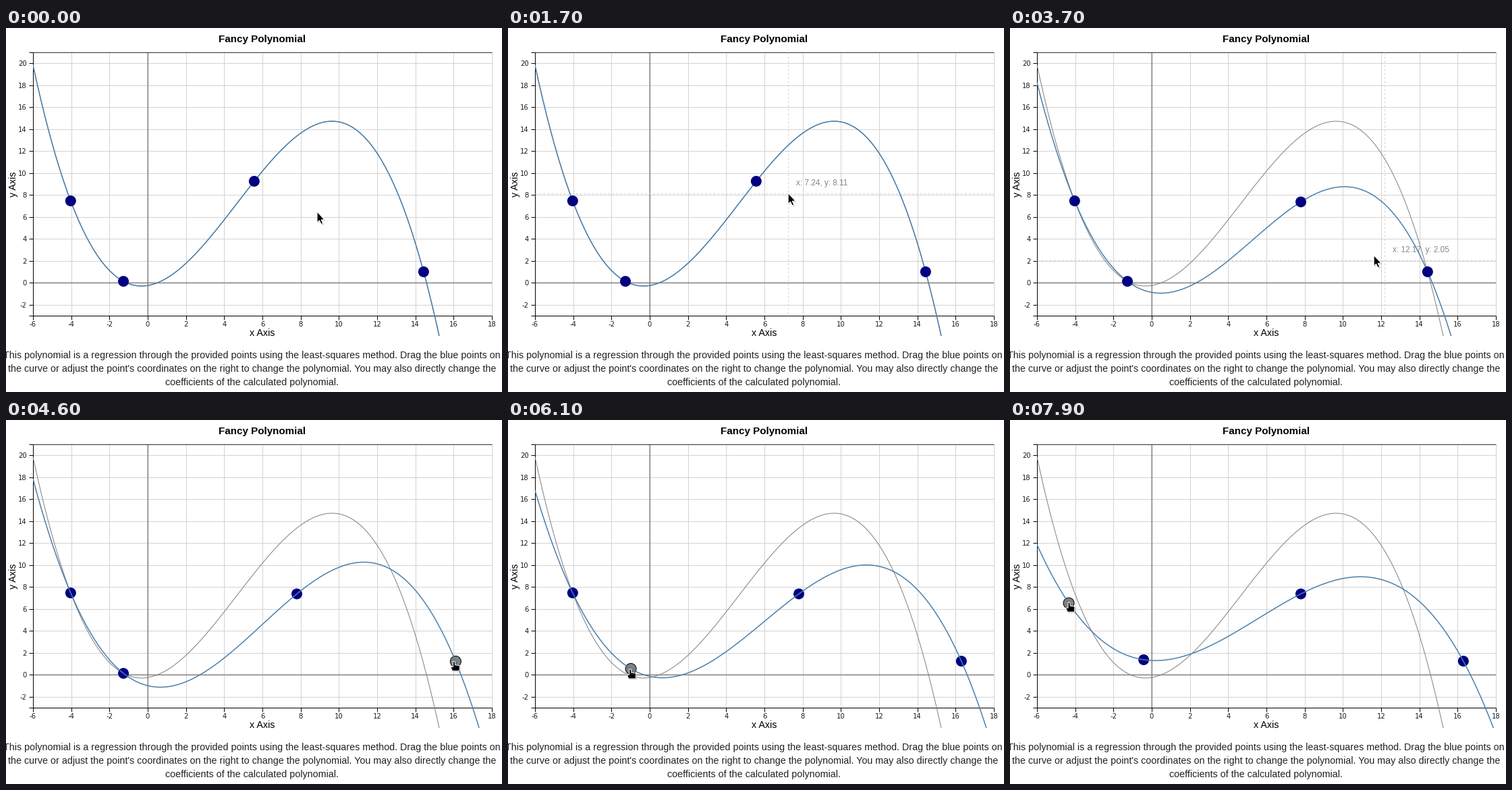
Animation of 735x539 px, one loop 8 s. Source, as a matplotlib script:

```python
import numpy as np
import matplotlib.pyplot as plt
from matplotlib.animation import FuncAnimation
from matplotlib.patches import Circle, Polygon, Rectangle

W, H, DPI = 735, 539, 100
PX = 72 / DPI
STEP, FRAMES = 100, 80
LEFT, RIGHT, TOP, BOTTOM = 40, 720, 36, 426
SX, SY = (RIGHT - LEFT) / 24, (BOTTOM - TOP) / 24
NAVY, STEEL, GRAY, PALE = "#000080", "#4a7fab", "#808080", "#d3d3d3"
HOVER, BOW, POINTER_LAG = 100, 19, 30


def to_px(x, y):
    return LEFT + (np.asarray(x) + 6) * SX, TOP + (21 - np.asarray(y)) * SY


def to_data(x, y):
    return (x - LEFT) / SX - 6, 21 - (y - TOP) / SY


# The pointer rests, pauses, then visits and drags each point in turn
REST, PAUSE = (8.86, 6.41), (7.24, 8.11)
POINTS = [(-4.03, 7.46), (-1.27, 0.13), (5.57, 9.25), (14.43, 1.0)]
# Point index: drag start, drag end, destination
DRAGS = {
    2: (2450, 3350, (7.80, 7.37)),
    3: (4000, 4670, (16.30, 1.24)),
    1: (5800, 6700, (-0.42, 1.37)),
    0: (7400, 7900, (-4.34, 6.53)),
}


def build_legs():
    legs = [(800, 1600, REST, PAUSE, False)]
    place, leave = PAUSE, 1750
    for index, (start, end, goal) in DRAGS.items():
        legs.append((leave, start - HOVER, place, POINTS[index], False))
        legs.append((start, end, POINTS[index], goal, True))
        place, leave = goal, end
    return legs


LEGS = build_legs()


def cursor_at(t):
    """Free moves ease along a slight arc; drags are straight and even."""
    begin, finish, a, b, drag = [leg for leg in LEGS if leg[0] <= max(t, 800)][-1]
    u = np.clip((t - begin) / (finish - begin), 0, 1)
    a, b = np.array(to_px(*a)), np.array(to_px(*b))
    if drag:
        return a + (b - a) * u
    u = u * u * (3 - 2 * u)
    dx, dy = b - a
    normal = np.array([-dy, dx]) / np.hypot(dx, dy)
    return a + (b - a) * u + normal * BOW * 4 * u * (1 - u)


def point_at(index, t):
    start, end, _ = DRAGS[index]
    return cursor_at(np.clip(t, start, end))


def points_at(t):
    return np.array([point_at(i, t) for i in range(len(POINTS))])


def fitted_curve(points):
    coeffs = np.polyfit(*to_data(points[:, 0], points[:, 1]), 3)
    x = np.arange(-6, 18.01, 0.2)
    return to_px(x, np.polyval(coeffs, x))


fig = plt.figure(figsize=(W / DPI, H / DPI), dpi=DPI, facecolor="white")
ax = fig.add_axes([0, 0, 1, 1])
ax.set(xlim=(0, W), ylim=(H, 0))
ax.axis("off")


def line(x, y, color, width=1, z=1, **kw):
    return ax.plot(x, y, color=color, lw=width * PX, zorder=z,
                   solid_capstyle="butt", **kw)[0]


def label(x, y, text, size, font="Liberation Sans", color="black", ha="center", **kw):
    return ax.text(x, y, text, fontsize=size * PX, fontfamily=font, color=color,
                   ha=ha, va="baseline", zorder=4, **kw)


# Grid, ticks and axes
for v in range(-6, 19, 2):
    x = to_px(v, 0)[0]
    line([x, x], [TOP, BOTTOM], PALE)
    line([x, x], [BOTTOM, BOTTOM + 6], "black", z=3)
    label(x, 442, str(v), 10, "DejaVu Sans", "#1a1a1a")
for v in range(-2, 21, 2):
    y = to_px(0, v)[1]
    line([LEFT, RIGHT], [y, y], PALE)
    line([LEFT - 6, LEFT], [y, y], "black", z=3)
    label(31, y + 4, str(v), 10, "DejaVu Sans", "#1a1a1a", ha="right")
zero_x, zero_y = to_px(0, 0)
line([zero_x + 0.3] * 2, [TOP, BOTTOM], GRAY, 1.5, 2, snap=False)
line([LEFT, RIGHT], [zero_y + 0.2] * 2, GRAY, 1.5, 2, snap=False)
line([LEFT - 6, LEFT, LEFT, LEFT - 6], [TOP, TOP, BOTTOM, BOTTOM], "black", z=3)
line([LEFT, RIGHT], [BOTTOM, BOTTOM], "black", z=3)
line([LEFT, RIGHT], [TOP, TOP], "#303030", z=3)

# Captions
label(380, 21, "Fancy Polynomial", 15.1, weight="bold")
label(380, 456, "x Axis", 14.2)
label(15, 231, "y Axis", 14.2, rotation=90, rotation_mode="anchor")
CAPTION = (
    "This polynomial is a regression through the provided points using the "
    "least-squares method. Drag the blue points on",
    "the curve or adjust the point's coordinates on the right to change the "
    "polynomial. You may also directly change the",
    "coefficients of the calculated polynomial.",
)
for row, text in enumerate(CAPTION):
    label(364.8, 489 + 20 * row, text, 14.27, color="#212121")

# Moving parts
clip = Rectangle((LEFT, TOP), RIGHT - LEFT, 420, transform=ax.transData)
first_curve = line(*fitted_curve(points_at(0)), GRAY, 1, 5)
curve = line([], [], STEEL, 1.5, 6)
for c in (first_curve, curve):
    c.set_clip_path(clip)
dots = [ax.add_patch(Circle((0, 0), 8, zorder=7, ec="black")) for _ in POINTS]
cross_v, cross_h = (line([], [], PALE, 1, 4, linestyle=(0, (3, 3))) for _ in "vh")
readout = label(0, 0, "", 11.75, color="#858585", ha="left")

ARROW = np.array([(0, -1), (0, 15), (3.4, 11.8), (6, 17.4), (8.6, 16.3),
                  (6.1, 10.9), (10.8, 10.6)])
HAND = np.array([(-1.5, 0), (1.5, 0), (1.5, 5), (8.5, 6), (8, 14), (-2.5, 14),
                 (-5, 8), (-1.5, 8)])
shadow = ax.add_patch(Polygon(ARROW, fc="black", ec="none", alpha=0.2, zorder=10))
pointer = ax.add_patch(Polygon(ARROW, fc="black", ec="white", lw=PX, zorder=11))


def update(frame):
    t = frame * STEP
    cursor, points = cursor_at(t), points_at(t)
    curve.set_data(*fitted_curve(points))

    dragging = False
    for i, dot in enumerate(dots):
        start, end, _ = DRAGS[i]
        active = start < t <= end
        dragging |= active
        dot.center = points[i]
        dot.set_facecolor(GRAY if active else NAVY)
        dot.set_linewidth(PX if active else 0)
    curve.set_zorder(8 if dragging else 6)

    on_point = np.hypot(*(points - cursor).T).min() < 8
    shape = (HAND if on_point else ARROW) + cursor_at(t - POINTER_LAG)
    pointer.set_xy(shape)
    shadow.set_xy(shape + 1.5)

    cx, cy = cursor
    for part in (cross_v, cross_h, readout):
        part.set_visible(bool(t >= 800 and not on_point))
    cross_v.set_data([cx, cx], [TOP, BOTTOM])
    cross_h.set_data([LEFT, RIGHT], [cy, cy])
    x, y = to_data(cx, cy)
    readout.set_text(f"x: {x:.2f}, y: {y:.2f}")
    readout.set_position((cx + 12, cy - 12))
    return [curve, *dots, cross_v, cross_h, readout, shadow, pointer]


anim = FuncAnimation(fig, update, frames=FRAMES, interval=STEP, repeat=True,
                     repeat_delay=0, blit=False)
plt.show()
```
